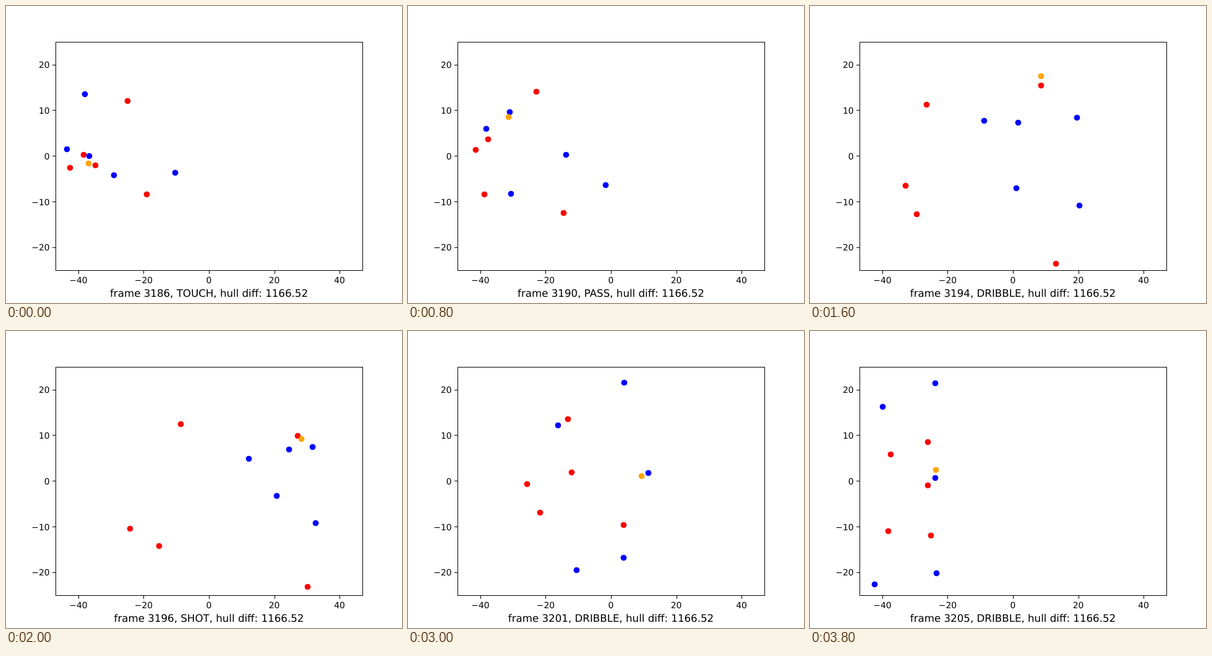
Animation of 640x480 px, one loop 4000 ms. Source, as an HTML page with a canvas:

```html
<!DOCTYPE html>
<html lang="en">
<head>
<meta charset="utf-8">
<style>
  html, body { margin: 0; width: 100%; height: 100%; overflow: hidden; background: #fff; }
  canvas { display: block; }
</style>
</head>
<body>
<canvas id="plot" width="640" height="480"></canvas>
<script>
const ctx = document.getElementById('plot').getContext('2d');
const STEP = 200, COUNT = 20;

// Every dot passes through seven key points [x, y, x, y, ...] at these moments
const MOMENTS = [0, 2, 5, 9, 10, 13, 17];

const teams = [
  { color: '#f00', paths: [
    [196,153, 190,160, 265,95, 471,169, 413,138, 258,142, 190,179],
    [125,240, 137,232, 123,179, 282,150, 369,178, 264,228, 190,249],
    [103,261, 108,229, 118,253, 200,319, 229,282, 192,247, 130,199],
    [144,257, 129,292, 126,322, 247,347, 354,351, 213,293, 126,323],
    [227,304, 231,312, 312,381, 487,413, 518,262, 348,313, 195,330]
  ] },
  { color: '#00f', paths: [
    [127,142, 148,165, 217,178, 457,191, 451,161, 349,83, 202,84],
    [98,231, 109,213, 182,173, 392,206, 447,212, 242,152, 117,122],
    [134,242, 139,290, 243,314, 437,266, 529,259, 272,386, 104,409],
    [174,273, 208,266, 360,185, 495,187, 533,188, 348,366, 204,391],
    [273,269, 297,277, 374,311, 500,310, 539,221, 388,229, 202,237]
  ] },
  { color: '#ffa500', paths: [
    [133,254, 122,230, 271,85, 477,174, 536,208, 377,234, 203,224]
  ] }
];

function eventAt(n) {
  if (n === 1 || n === 10) return 'SHOT';
  if (n === 2 || n === 11) return 'SAVE';
  if (n === 4) return 'PASS';
  return n < 6 || n === 12 ? 'TOUCH' : 'DRIBBLE';
}

// Smooth curve through the key points; axis is 0 for x, 1 for y
function along(path, axis, m) {
  const last = MOMENTS.length - 1;
  const value = i => path[2 * i + axis];
  const slope = i => {
    const a = Math.max(0, i - 1), b = Math.min(last, i + 1);
    return (value(b) - value(a)) / (MOMENTS[b] - MOMENTS[a]);
  };
  const j = Math.max(1, MOMENTS.findIndex(k => k >= m)), i = j - 1;
  const span = MOMENTS[j] - MOMENTS[i];
  const t = (m - MOMENTS[i]) / span, s = 1 - t;
  return Math.round(
    value(i) * s * s * (1 + 2 * t) + value(j) * t * t * (1 + 2 * s) +
    span * t * s * (slope(i) * s - slope(j) * t));
}

function text(str, x, y, size, align) {
  ctx.font = `${size}px "DejaVu Sans", sans-serif`;
  ctx.textRendering = 'geometricPrecision';
  ctx.textAlign = align;
  ctx.fillText(str, x, y);
}

const label = v => String(v).replace('-', '\u2212');

function drawAxes() {
  ctx.fillStyle = ctx.strokeStyle = '#000';
  ctx.strokeRect(80.5, 58.5, 496, 369);
  for (let v = -40; v <= 40; v += 20) {
    const x = 328 + v * 496 / 94;
    ctx.fillRect(Math.round(x), 428, 1, 5);
    text(label(v), x, 448, 13.89, 'center');
  }
  for (let v = -20; v <= 20; v += 10) {
    const y = 242.4 - v * 7.392;
    ctx.fillRect(75, Math.round(y), 5, 1);
    text(label(v), 70.6, Math.round(y + 5.2), 13.89, 'right');
  }
}

function draw(n) {
  ctx.fillStyle = '#fff';
  ctx.fillRect(0, 0, 640, 480);
  drawAxes();
  text(`frame ${3186 + n}, ${eventAt(n)}, hull diff: 1166.52`, 328, 470, 16.67, 'center');

  // Positions hold still while a save turns into a touch
  const moment = n - (n > 2) - (n > 11);
  for (const { color, paths } of teams) {
    ctx.fillStyle = color;
    for (const path of paths) {
      ctx.beginPath();
      ctx.arc(along(path, 0, moment) + 0.5, along(path, 1, moment) + 0.5, 4.86, 0, 2 * Math.PI);
      ctx.fill();
    }
  }
}

function tick() {
  draw(Math.floor(performance.now() / STEP) % COUNT);
  requestAnimationFrame(tick);
}
tick();
</script>
</body>
</html>
```
